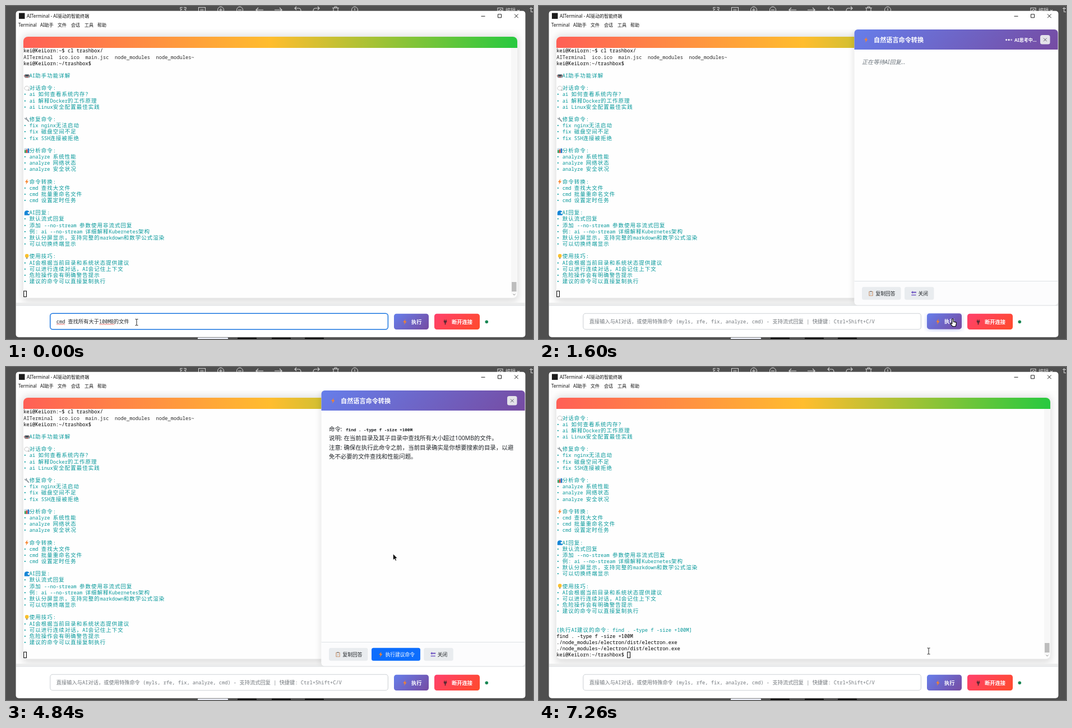
These frames come from a looping animation (940 px wide and 596 px high, 8 s). An HTML page:

```html
<!DOCTYPE html>
<html lang="zh-CN">
<head>
<meta charset="utf-8">
<title>AITerminal</title>
<style>
html, body { margin: 0; width: 100%; height: 100%; overflow: hidden; background: #4f4f4f; }
svg { display: block; width: 940px; height: 596px; }
text { white-space: pre; font-family: "Noto Sans", "Noto Sans CJK SC", "Noto Sans CJK", sans-serif; }
.mono { font-family: "Noto Sans Mono", "DejaVu Sans Mono", monospace; }
</style>
</head>
<body>
<svg id="stage" viewBox="0 0 940 596" xmlns="http://www.w3.org/2000/svg"></svg>
<script>
const LOOP = 8000, CELL = 5.25, ROW = 11.15, LEFT = 31.2, TEAL = '#06989a';
const HOST = 'kei@KeiLorn:~';

// ---- drawing helpers ----
const rect = (x, y, w, h, fill, r = 0, more = '') =>
  `<rect x="${x}" y="${y}" width="${w}" height="${h}" rx="${r}" fill="${fill}" ${more}/>`;
const path = (d, stroke, w = 1, more = '') =>
  `<path d="${d}" fill="none" stroke="${stroke}" stroke-width="${w}" ${more}/>`;
const shape = (d, fill, more = '') => `<path d="${d}" fill="${fill}" ${more}/>`;
const text = (x, y, s, size, fill, more = '') =>
  `<text x="${x}" y="${y}" font-size="${size}" fill="${fill}" ${more}>${s}</text>`;
const group = (id, body, more = '') => `<g id="${id}" ${more}>${body}</g>`;
const put = (x, y, body) => `<g transform="translate(${x} ${y})">${body}</g>`;

// Monospaced line whose Chinese runs have their own advance
function mixed(x, y, s, fill, cell, wide, size) {
  let out = '';
  for (const run of s.match(/[\u2e80-\uffff]+|[^\u2e80-\uffff]+/g) || []) {
    const cjk = run.charCodeAt(0) >= 0x2e80;
    out += cjk
      ? text(x, y, run, size, fill, `letter-spacing="${wide - size}"`)
      : text(x, y, run, cell / 0.6, fill, 'class="mono"');
    x += run.length * (cjk ? wide : cell);
  }
  return out;
}

// Same geometry as a CSS 135deg gradient
function diagonal(id, x, y, w, h, a, b) {
  const cx = x + w / 2, cy = y + h / 2, d = (w + h) / 4;
  return `<linearGradient id="${id}" gradientUnits="userSpaceOnUse" x1="${cx - d}" y1="${cy - d}" x2="${cx + d}" y2="${cy + d}">
    <stop stop-color="${a}"/><stop offset="1" stop-color="${b}"/></linearGradient>`;
}

function squiggle(x, y, w) {
  let d = `M${x} ${y}`;
  for (let i = 0; i < w / 3; i++) d += 'q.75 -1.8 1.5 0t1.5 0';
  return path(d, '#e0443e', 0.8);
}

// ---- small icons, each in a 10 by 10 box ----
const icon = {
  bolt: shape('M6.2 0L1.6 5.6H4.4L3.2 10 8 4H5.2Z', '#f7822b'),
  robot: rect(0.8, 2, 8.6, 6.6, '#8d979e', 1.5) + rect(2, 3.4, 6.2, 2.2, '#26323a', 1) +
    rect(3, 7, 4.2, 1, '#c9423c') + rect(0, 3.8, 1, 2.4, '#c9423c') + rect(9.2, 3.8, 1, 2.4, '#c9423c'),
  chat: '<ellipse cx="5" cy="4.8" rx="4.2" ry="3.6" fill="#fff" stroke="#8b8b8b" stroke-width=".7" stroke-dasharray="1.6 .7"/>' +
    path('M6.8 8L8.6 9.4 8.2 7', '#8b8b8b', 0.7),
  wrench: path('M3.4 3.4L8.6 8.8', '#8a949b', 1.9) + path('M1 2.6L2.6 4.4 4.6 3.2 3.8 1', '#8a949b', 1.4),
  chart: rect(0.4, 0.8, 9.2, 8.8, '#c9dbe6', 1) + rect(1, 4, 2.4, 5.2, '#2e9e4f') +
    rect(3.8, 3, 2.4, 6.2, '#e0433c') + rect(6.6, 1.4, 2.4, 7.8, '#1f74cc'),
  wave: shape('M.6 9.2V5Q1 .8 5.4.8 8.8 1 9.4 4 7.4 2.6 6.4 4.4 6 6.6 9.6 7V9.2Z', '#1786d6'),
  bulb: '<circle cx="5" cy="3.8" r="3.3" fill="#fbc02d"/>' + rect(3.6, 6.6, 2.8, 2.6, '#9a9a8c', 0.8),
  clip: rect(1, 1.2, 7, 8.4, '#b9784a', 0.8) + rect(1.9, 2.2, 5.2, 6.6, '#f5f5f5') +
    rect(3, 0.4, 3, 1.8, '#7b8790', 0.5) + path('M2.8 4.4H6.2M2.8 6H6.2M2.8 7.4H5', '#9aa3a9', 0.6),
  back: shape('M.4 3L3.2.6V2.1H9.4V3.9H3.2V5.4Z', '#6a4fc0') + path('M1 7.8H9.2', '#6a4fc0', 1.8, 'stroke-dasharray="1.6 .4"'),
  plug: shape('M2.4 1H3.6V3H5.4V1H6.6V3H7.2V5.4L5.4 7V10H3.6V7L1.8 5.4V3H2.4Z', '#5d2a34'),
};

// ---- terminal rows: leading "icon|" picks an icon ----
const rows = [
  HOST + '$ cl trashbox/',
  'AITerminal  ico.ico  main.jsc  node_modules  node_modules~',
  HOST + '/trashbox$', '',
  'robot|AI助手功能详解', '',
  'chat|对话命令:', '• ai 如何查看系统内存？', '• ai 解释Docker的工作原理', '• ai Linux安全配置最佳实践', '',
  'wrench|修复命令:', '• fix nginx无法启动', '• fix 磁盘空间不足', '• fix SSH连接被拒绝', '',
  'chart|分析命令:', '• analyze 系统性能', '• analyze 网络状态', '• analyze 安全状况', '',
  'bolt|命令转换:', '• cmd 查找大文件', '• cmd 批量重命名文件', '• cmd 设置定时任务', '',
  'wave|AI回复:', '• 默认流式回复', '• 添加 --no-stream 参数使用非流式回复',
  '• 例: ai --no-stream 详细解释Kubernetes架构',
  '• 默认分屏显示，支持完整的markdown和数学公式渲染', '• 可以切换终端显示', '',
  'bulb|使用技巧:', '• AI会根据当前目录和系统状态提供建议', '• 可以进行连续对话，AI会记住上下文',
  '• 危险操作会有明确警告提示', '• 建议的命令可以直接复制执行', '', '',
  '[执行AI建议的命令: find . -type f -size +100M]',
  'find . -type f -size +100M',
  './node_modules/electron/dist/electron.exe',
  './node_modules~/electron/dist/electron.exe',
  HOST + '/trashbox$',
];

function rowMarkup(s, i) {
  const y = 83.4 + i * ROW;
  const [, kind, body] = s.match(/^(?:(\w+)\|)?(.*)$/);
  const dark = i < 3 || i > 40;
  return group('row' + i,
    (kind ? put(LEFT + 1, y - 8, icon[kind]) : '') +
    mixed(LEFT + (kind ? 2 * CELL : 0), y, body, dark ? (i === 1 ? '#2b2b2b' : '#000') : TEAL, CELL, 2 * CELL, 9.5));
}

// ---- scene parts ----
const defs = `<defs>
  ${diagonal('run', 692, 551, 62, 28, '#667eea', '#764ba2')}
  ${diagonal('cut', 764, 551, 81, 28, '#ff416c', '#ff4b2b')}
  ${diagonal('head', 563, 42, 362, 36, '#667eea', '#764ba2')}
  <linearGradient id="bar"><stop stop-color="#ff5f56"/><stop offset=".5" stop-color="#ffbd2e"/><stop offset="1" stop-color="#27c93f"/></linearGradient>
  <filter id="soft" x="-10%" y="-10%" width="120%" height="120%"><feGaussianBlur stdDeviation="6"/></filter>
  <clipPath id="body"><rect x="18" y="42" width="908" height="494"/></clipPath>
  <clipPath id="screen"><rect x="31" y="75" width="870" height="447"/></clipPath>
</defs>`;

function backdrop() {
  const line = d => path(d, '#d4d4d4', 1.1);
  const ring = x => `<circle cx="${x}" cy="7" r="5.5" fill="none" stroke="#d4d4d4"/>`;
  return rect(0, 0, 940, 596, '#4f4f4f') +
    line('M311 6V2.5H315M317 2.5H321V6M311 8L314 5M321 8L318 5') + line('M343.5 10V2.5H355.5V10M348 5V9M351 5V9') +
    ring(383) + line('M380 7H386M383 4V10') + ring(417) + line('M414 7H420') +
    line('M459 7H446L450 3M446 7L450 11') + line('M479 7H492L488 3M492 7L488 11') +
    line('M515 4H522Q526 4 526 9M518 1L515 4 518 7') + line('M559 4H552Q548 4 548 9M556 1L559 4 556 7') +
    line('M582 3.5H594M586 3V1.5H590V3M584 4V10M592 4V10') + ring(622) + line('M622 4V8') +
    line('M877 10V3.5H886V10M879 9L882 6 885 9') + text(891, 10.5, '编辑', 9, '#d4d4d4') + line('M912 7L914 9 916 7') +
    line('M934 4.5H940M936.5 2V10.5H940') +
    rect(342, 593.5, 54, 4, '#eef1fb', 1) + [413, 474, 533].map(x => rect(x, 593.5, 34, 4, '#111', 1)).join('');
}

function frameMarkup() {
  const menu = [[22, 'Terminal'], [61, 'AI助手'], [92, '文件'], [116, '会话'], [140, '工具'], [163, '帮助']];
  return rect(17.6, 8.7, 908.8, 584.1, '#fff', 5) + rect(23, 12.5, 10.5, 10.5, '#1c1c1c') +
    text(37, 20.8, 'AITerminal - AI驱动的智能终端', 8, '#111') +
    menu.map(([x, s]) => text(x, 37.4, s, 8, '#111')).join('') +
    path('M847.5 18.3H854.5M877.5 14.8H883.5V20.8H877.5ZM907 14.6L913.6 21.2M913.6 14.6L907 21.2', '#222', 1);
}

function terminalMarkup() {
  return rect(18, 42, 908, 493, '#fdfdfd') +
    group('shade', rect(28, 51, 887, 480, '#000', 12, 'opacity=".1" filter="url(#soft)"'), 'clip-path="url(#body)"') +
    rect(18, 531, 908, 5, '#eceded') +
    rect(31, 55, 881, 467.5, '#fefefe', 8) +
    shape('M31 75V63a8 8 0 0 1 8 -8H904a8 8 0 0 1 8 8V75Z', 'url(#bar)') +
    `<g clip-path="url(#screen)">` +
    group('scroll', rows.map(rowMarkup).join('') + group('caret', rect(31.7, 0, 4.8, 10.2, 'none', 0, 'stroke="#000"'))) + '</g>' +
    rect(901, 75, 10.5, 440, '#f7f7f7') + rect(902, 494, 8.5, 17, '#bdbdbd') +
    path('M904.4 515.6L906.4 517.4 908.4 515.6', '#777', 1);
}

const prompt = '直接输入与AI对话，或使用特殊命令 (myls, rfe, fix, analyze, cmd) - 支持流式回复 | 快捷键: Ctrl+Shift+C/V';

function inputMarkup() {
  return rect(18, 536, 908, 51, '#fff') + path('M18 536H926', '#dcdfe2', 1) +
    rect(78.8, 550.2, 602.6, 28.6, '#fff', 4.5, 'id="field"') +
    group('typed', mixed(89.8, 567.6, 'cmd 查找所有大于100MB的文件', '#212529', 5.2, 9.25, 9.2)) +
    group('spell', squiggle(90, 569.6, 15) + squiggle(166.3, 569.6, 25)) +
    group('hint', mixed(89.8, 568.3, prompt, '#72777c', 5.22, 9.25, 9.2)) +
    group('runBtn', rect(693, 553, 60, 27, '#667eea', 5, 'id="glow" opacity=".4" filter="url(#soft)"') +
      rect(692, 550.8, 62, 28.2, 'url(#run)', 4.5) + put(706.6, 560.5, icon.bolt) +
      text(723, 568.6, '执行', 9.2, '#fff', 'font-weight="700"')) +
    group('cutBtn', rect(764, 550.8, 81, 28.2, 'url(#cut)', 4.5) + put(779, 560.3, icon.plug) +
      text(795, 568.6, '断开连接', 9.25, '#fff', 'font-weight="700"')) +
    '<circle cx="857.3" cy="565.3" r="2.8" fill="#198754"/>';
}

const button = (x, w, glyph, s, fill, ink, id) =>
  rect(x, 502.8, w, 23, fill, 3.5, `id="${id}"`) + put(x + 11.5, 509.5, icon[glyph]) +
  text(x + 24.5, 517.7, s, 8.75, ink, 'font-weight="500"');

// Reply pieces: x, line, text, optional mono
const reply = [
  [576, 0, '命令:'], [606, 0, 'find . -type f -size +100M', true],
  [576, 1, '说明: 在当前目录及其子目录中查找所有大小超过100MB的文件。'],
  [576, 2, '注意: 确保在执行此命令之前，当前目录确实是你想要搜索的目录，以避'],
  [576, 3, '免不必要的文件查找和性能问题。'],
];
const replyLength = reply.reduce((n, p) => n + p[2].length, 0);

function panelMarkup() {
  return rect(561, 44, 367, 490, '#000', 6, 'opacity=".1" filter="url(#soft)"') +
    rect(562.5, 42, 363, 493.5, '#fefefe', 6) +
    shape('M562.5 78V48a6 6 0 0 1 6 -6H919.5a6 6 0 0 1 6 6V78Z', 'url(#head)') +
    put(578.5, 55.5, icon.bolt) + text(597, 64.6, '自然语言命令转换', 11.15, '#fff', 'font-weight="600"') +
    rect(894, 52, 17.5, 16.5, '#e4e3ea', 3.5) + path('M900 57.6L905.6 63.2M905.6 57.6L900 63.2', '#5b5b66', 1) +
    group('status', [833.6, 838.1, 842.6].map(x => `<circle class="dot" cx="${x}" cy="60.6" r="1.6" fill="#fff"/>`).join('') +
      text(848, 63.6, 'AI思考中...', 8, '#fff', 'font-weight="600"')) +
    group('wait', text(576, 103.6, '正在等待AI回复...', 10.1, '#6c757d', 'font-style="italic"')) +
    group('reply', reply.map(([x, n, , mono]) =>
      text(x, 114.6 + n * 16.6, '', mono ? 7.63 : 10.45, '#212529', mono ? 'class="mono" font-weight="600"' : 'font-weight="350"')).join('')) +
    shape('M562.5 492.5H925.5V529.5a6 6 0 0 1 -6 6H568.5a6 6 0 0 1 -6 -6Z', '#fcfcfd') + path('M562.5 492.5H925.5', '#dee2e6', 1) +
    button(576, 69.5, 'clip', '复制回答', '#e9ecef', '#212529', 'copy') +
    group('apply', button(652, 87, 'bolt', '执行建议命令', '#0d6efd', '#fff', 'applyBox')) +
    group('close', button(652, 52.5, 'back', '关闭', '#e9ecef', '#212529', 'closeBox'));
}

const pointers =
  group('arrow', shape('M0 0V11L2.6 8.7 4.3 12.4 6 11.6 4.4 8H7.6Z', '#000', 'stroke="#fff" stroke-width=".7"')) +
  group('hand', shape('M-1.2 1a1.2 1.2 0 0 1 2.4 0V5l4 .9q1.3 .4 1.2 1.8l-.6 3.6L5 13.5H-.3L-3.6 9.2q-.5 -1.2 .8 -1.6L-1.2 8.6Z', '#fff', 'stroke="#000" stroke-width="1.1"')) +
  group('beam', path('M-2.5 -5.5H-.8L0 -4.8 .8 -5.5H2.5M0 -5V5M-2.5 5.5H-.8L0 4.8 .8 5.5H2.5', '#222', 1));

document.getElementById('stage').innerHTML = defs + backdrop() + frameMarkup() + terminalMarkup() +
  group('clip', group('panel', panelMarkup()), 'clip-path="url(#body)"') + inputMarkup() + pointers;

// ---- motion ----
const $ = id => document.getElementById(id);
const show = (id, on) => { $(id).style.display = on ? '' : 'none'; };
const move = (id, x, y) => $(id).setAttribute('transform', `translate(${x} ${y})`);
const set = (id, attrs) => { for (const k in attrs) $(id).setAttribute(k, attrs[k]); };
const dots = document.querySelectorAll('.dot'), lines = $('reply').children;

const CLICK = 940, OPEN = 1320, SETTLED = 1450, STREAM = 4450, DONE = 4840, APPLY = 7130, OUTPUT = 7260;

// Pointer stops: time, x, y
const track = [
  [0, 233, 566], [130, 300, 566], [260, 470, 565], [390, 660, 565], [520, 888, 558], [650, 805, 557], [790, 747, 561.5],
  [1600, 738, 560], [1730, 721, 561], [1880, 634, 572], [2020, 652, 470], [2140, 690.5, 334.5],
  [5920, 690, 350], [6050, 692, 400], [6180, 696, 460], [6310, 697, 498], [6440, 697, 508.5], [7130, 695, 508.5],
];
const inside = (x, y, l, t, r, b) => x >= l && x <= r && y >= t && y <= b;

function draw(t) {
  const [, x, y] = track.filter(p => p[0] <= t).pop();
  const open = t >= OPEN && t < APPLY, done = t >= DONE;

  const overRun = inside(x, y, 692, 550, 754, 579), overCut = inside(x, y, 764, 550, 845, 579);
  const overApply = open && done && inside(x, y, 652, 503, 739, 525);
  const overText = inside(x, y, 78, 550, 682, 579) || (!open && inside(x, y, 31, 75, 901, 522));
  const kind = overRun || overCut || overApply ? 'hand' : overText ? 'beam' : 'arrow';
  for (const id of ['arrow', 'hand', 'beam']) show(id, id === kind);
  move(kind, x, y);
  move('runBtn', 0, overRun ? -0.6 : 0);
  move('cutBtn', 0, overCut ? -0.6 : 0);
  show('glow', overRun);
  set('applyBox', { fill: overApply ? '#0b5ed7' : '#0d6efd' });

  const focus = t < CLICK, sent = t >= OPEN;
  set('field', focus ? { stroke: '#1a75e0', 'stroke-width': 1.5 }
    : sent ? { stroke: '#ced2d6', 'stroke-width': 1.1 } : { stroke: '#5b9df0', 'stroke-width': 1.4 });
  show('typed', !sent);
  show('spell', focus);
  show('hint', sent);

  show('panel', open);
  move('panel', t < SETTLED ? 80 : 0, 0);
  show('status', !done);
  show('wait', t < STREAM);
  show('apply', done);
  move('close', done ? 93.3 : 0, 0);
  dots.forEach((dot, i) => {
    const p = ((t - 1050 - i * 200 + 2800) % 1400) / 840;
    dot.setAttribute('opacity', p < 1 ? 0.4 + 0.6 * Math.sin(Math.PI * p) ** 2 : 0.4);
  });
  let left = t < STREAM ? 0 : Math.ceil(replyLength * Math.min(1, (t - STREAM + 130) / (DONE - STREAM)));
  reply.forEach((p, i) => {
    lines[i].textContent = p[2].slice(0, Math.max(0, left));
    left -= p[2].length;
  });

  const last = t < APPLY ? 39 : t < OUTPUT ? 41 : 44;
  for (let i = 40; i < rows.length; i++) show('row' + i, i <= last);
  move('scroll', 0, (39 - last) * ROW);
  move('caret', last === 44 ? 24 * CELL : last === 41 ? 26 * CELL : 0, 75.3 + last * ROW);
}

const start = performance.now();
function tick() {
  draw((performance.now() - start) % LOOP);
  requestAnimationFrame(tick);
}
tick();
</script>
</body>
</html>
```
